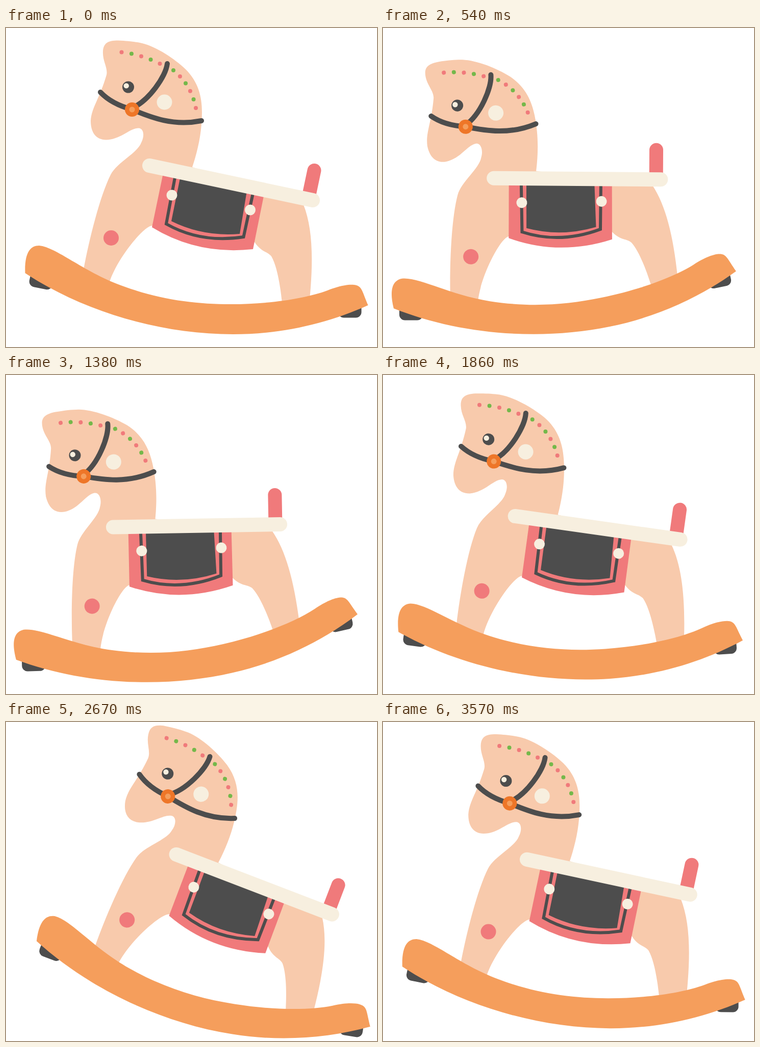
Recreate the animation shown at these times as an HTML page. Size 727x626 px, loop 3.6 s.

```html
<!DOCTYPE html>
<html lang="en">
<head>
<meta charset="utf-8">
<title>Rocking horse</title>
<style>
  html, body { margin: 0; width: 100%; height: 100%; overflow: hidden; background: #fff; }
  svg { display: block; }
  .skin { fill: #f8caac; }
  .wood { fill: #f59e5c; }
  .pink { fill: #f07a7b; }
  .dark { fill: #4d4d4d; }
  .cream { fill: #f7efdf; }
  .green { fill: #74b84a; }
  .line { fill: none; stroke: #4d4d4d; }
  .round { stroke-linecap: round; }
</style>
</head>
<body>
<svg width="727" height="626" viewBox="0 0 727 626">
  <g id="horse">
    <rect class="dark" x="32" y="545" width="46" height="28.5" rx="11" transform="rotate(11.55 371 597.5)"/>
    <rect class="dark" x="651" y="540" width="45.5" height="28.5" rx="11"/>

    <path class="skin" d="M190 46C191 30 199 24.500 220 24.500C240 25.500 253 27 267 30C295 37 330 60 352 81
      C376 105 384 133 384 165C384 205 376 240 365 273L583 347C600 390 603 450 595 532L541 540
      C537 500 530 465 520 448C512 438 500 440 487 420L287 388C272 386 219 450 203 498L152 474
      C163 415 184 330 205 288C217 264 257 246 265 225C272 212 270 197 260 196.500
      C243 196 225 219 196 219.500C176 219 166 205 166 182C168 155 183 140 197 92
      C200 78 189 65 190 46Z"/>

    <path class="wood" d="M37.500 481C36 440 48 427 65 427C98 430 150 477 225 505C300 533 370 542 440 542
      C520 542 590 530 630 515C655 505 672 503 682 504C698 506 697 515 709.500 544
      C630 580 540 601 445 601C300 601 150 555 37.500 481Z"/>

    <path class="pink" d="M308 285L505 330L484 434Q376 446 286 391Z"/>
    <path class="dark" d="M342 290L472 320L458 404Q386 410 324 379Z"/>
    <path class="line" stroke-width="6" d="M331.700 290L314 384.500Q382 423 465.500 410L484.500 322"/>
    <circle class="cream" cx="325" cy="328" r="10.5"/>
    <circle class="cream" cx="478.5" cy="357" r="10.5"/>

    <path class="round" stroke="#f07a7b" stroke-width="27" d="M604 279.500L594 327"/>
    <path class="round" stroke="#f7efdf" stroke-width="28" d="M281 270L601 338"/>

    <circle class="pink" cx="206" cy="412" r="15"/>
    <circle class="cream" cx="310.5" cy="145.5" r="15"/>
    <circle class="dark" cx="239.5" cy="116" r="11.5"/>
    <circle class="cream" cx="235.7" cy="113.4" r="5.2"/>
    <path class="line round" stroke-width="10" d="M185 126C203 145 225 154 247 160C285 176 328 193 383 182
      M316 70C313 95 280 143 247 157"/>
    <circle cx="247" cy="160" r="14" fill="#ee7628"/>
    <circle class="wood" cx="247" cy="160" r="5.5"/>

    <path class="mane" fill="none" data-beads="5" d="M226.500 47.500Q266 52 301.500 70"/>
    <path class="mane" fill="none" data-beads="6" d="M328 83Q363 111 372 157"/>
  </g>
</svg>
<script>
const LOOP = 3600, LOW = 920, HIGH = 2690;
const horse = document.getElementById('horse');

// Beads sit evenly along both halves of the mane, in alternating colours
let bead = 0;
for (const row of document.querySelectorAll('.mane')) {
  const count = +row.dataset.beads, gap = row.getTotalLength() / (count - 1);
  for (let i = 0; i < count; i++) {
    const { x, y } = row.getPointAtLength(i * gap);
    const color = bead++ % 2 ? 'green' : 'pink';
    horse.insertAdjacentHTML('beforeend', `<circle class="${color}" cx="${x}" cy="${y}" r="4"/>`);
  }
}

// Value at p of the timing curve cubic-bezier(x1, 0, x2, 1)
function ease(p, x1, x2) {
  let lo = 0, hi = 1, s;
  for (let i = 0; i < 24; i++) {
    s = (lo + hi) / 2;
    const x = 3 * s * (1 - s) * ((1 - s) * x1 + s * x2) + s ** 3;
    if (x < p) lo = s; else hi = s;
  }
  return s * s * (3 - 2 * s);
}

// Degrees: rock forward, far back, then return to rest
function tilt(t) {
  const forward = -19.1, back = 9.07;
  if (t < LOW) return forward * ease(t / LOW, 1 / 6, 5 / 6);
  if (t < HIGH) return forward + (back - forward) * ease((t - LOW) / (HIGH - LOW), 1 / 6, 5 / 6);
  return back * (1 - ease((t - HIGH) / (LOOP - HIGH), 0.4, 0.9));
}

const start = performance.now();
function draw(now) {
  const t = Math.max(0, now - start) % LOOP;
  horse.setAttribute('transform', `rotate(${tilt(t)} 371 597.5)`);
  requestAnimationFrame(draw);
}
draw(start);
</script>
</body>
</html>
```
